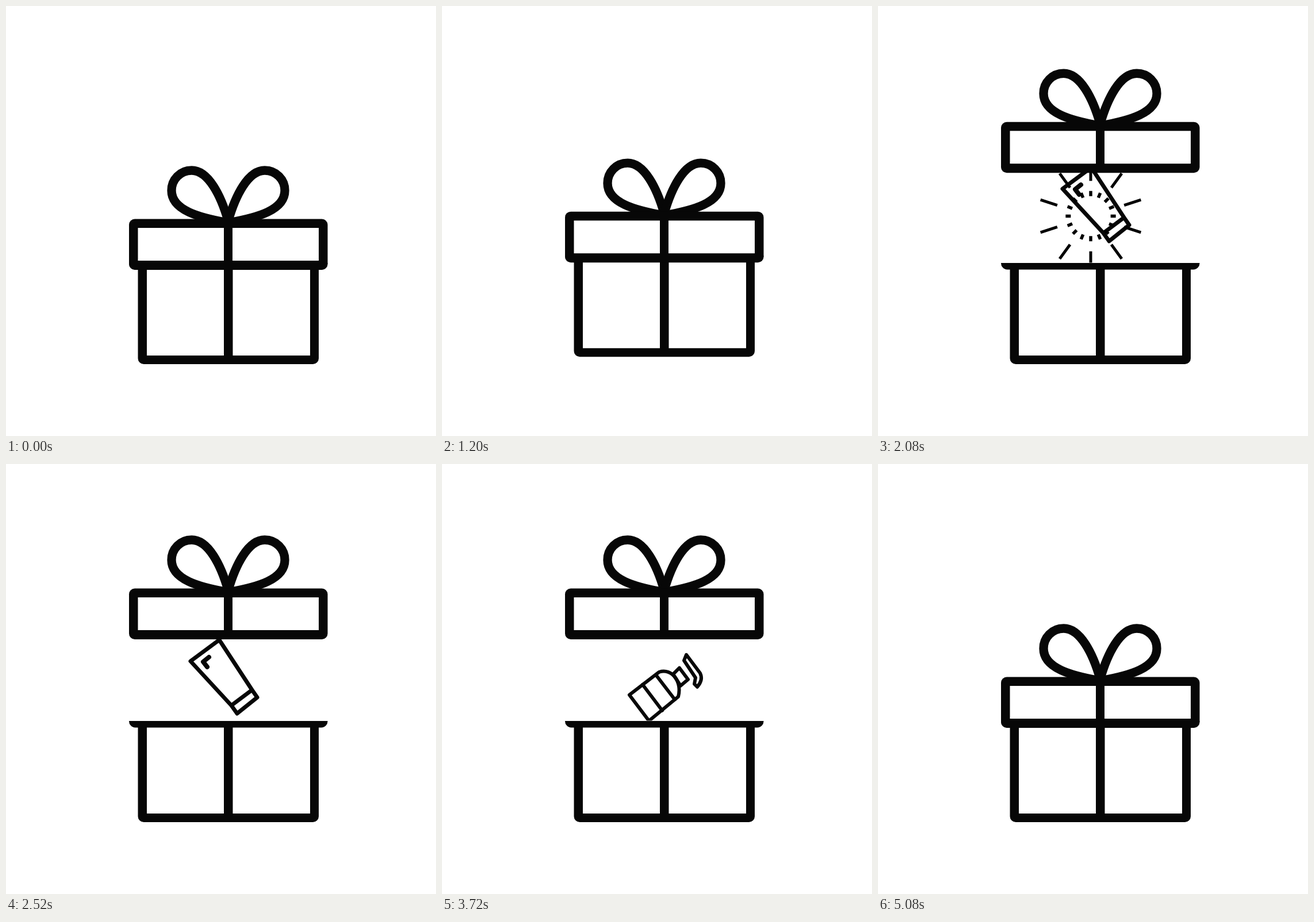
Recreate the animation shown at these times as an HTML page. Size 748 px wide and 748 px high, loop 5120 ms.

```html
<!DOCTYPE html>
<html lang="en">
<head>
<meta charset="utf-8">
<title>Gift box</title>
<style>
  html, body { margin: 0; width: 100%; height: 100%; overflow: hidden; background: #fff; }
  svg { display: block; width: 100%; height: 100%; }
  .line { fill: none; stroke: #070707; stroke-linejoin: round; stroke-linecap: round; }
  .ink { fill: #070707; }
  .paper { fill: #fff; }
</style>
</head>
<body>
<svg viewBox="0 0 748 748">
  <defs>
    <clipPath id="gap"><rect id="gapRect" x="0" width="748"/></clipPath>
    <filter id="blur" filterUnits="userSpaceOnUse" x="200" y="200" width="360" height="460">
      <feGaussianBlur id="blurAmount" stdDeviation="0"/>
    </filter>
    <path id="loop" d="M386.5 374C374 330 352 286 323 286C303 286 288 302 288 321C288 355 335 368 386 377"/>
  </defs>

  <g id="body">
    <path class="ink" d="M214 447H559.5A11 11 0 0 1 548.500 458.500H544V613A10 10 0 0 1 534 623H239.500A10 10 0 0 1 229.500 613V458.500H225A11 11 0 0 1 214 447Z"/>
    <path class="paper" d="M245 458.500H379V608H245ZM394.500 458.500H529V608H394.500Z"/>
  </g>

  <g clip-path="url(#gap)">
    <g class="item line" stroke-width="7">
      <g transform="translate(0 25)">
        <path d="M321 318L371 281L428 368L437 381L402 409L392 395ZM392 395L428 368"/>
        <path stroke-width="8" d="M353 311L343 319L350 328"/>
      </g>
    </g>
    <g class="item line" stroke-width="6">
      <g transform="translate(0 -40)">
        <path d="M326 438L378 398C400 391 418 415 411 441L360 483Z"/>
        <path d="M349 420L383 465M372 403L405 446"/>
        <path d="M402 402L413 391L428 411L415 422Z"/>
        <path d="M425 368L449 400C453 408 451 416 444 424L439 419L441 408L421 378Z"/>
      </g>
    </g>
    <g class="item line" stroke-width="5">
      <path d="M329 412L378 371L404 401L354 443ZM373 376L399 406M383 374L425 337L460 348L403 396"/>
    </g>
    <g transform="translate(370 365.500)" stroke="#000">
      <path id="rays"/>
      <path id="dashes"/>
    </g>
  </g>

  <g id="lid">
    <g class="line" stroke-width="15.300" style="stroke-linecap:butt">
      <use href="#loop"/>
      <use href="#loop" transform="matrix(-1 0 0 1 773 0)"/>
    </g>
    <rect class="ink" x="214" y="370.500" width="345.500" height="88.500" rx="10"/>
    <path class="paper" d="M229.500 386H379V443H229.500ZM394 386H544V443H394Z"/>
  </g>
</svg>
<script>
const LOOP = 5120, STEP = 40, OPEN = 154, DEPTH = 150;
const HOPS = [[0, 0], [280, 25], [560, 0], [850, 23], [1140, 6], [1440, 25], [1790, 0]];
const ITEMS = [
  { up: 1830, down: 2680, burst: 1930 },
  { up: 2930, down: 3690, burst: 3098 },
  { up: 3925, down: 4690, burst: 4090 }
];

const $ = id => document.getElementById(id);
const itemNodes = document.querySelectorAll('.item');
const clamp = x => Math.max(0, Math.min(1, x));
const part = (t, start, length) => clamp((t - start) / length);
const backOut = (u, s) => 1 + (s + 1) * (u - 1) ** 3 + s * (u - 1) ** 2;
const smooth = u => u * u * (3 - 2 * u);

// Height of the closed box: decelerates upward, accelerates downward.
function hop(t) {
  for (let i = 1; i < HOPS.length; i++) {
    const [t0, a] = HOPS[i - 1], [t1, b] = HOPS[i];
    if (t < t1) {
      const u = (t - t0) / (t1 - t0);
      return a + (b - a) * (b > a ? 1 - (1 - u) ** 2 : u * u);
    }
  }
  return 0;
}

function lidLift(t) {
  if (t < 1790) return hop(t);
  if (t < 4500) return OPEN * backOut(part(t, 1790, 380), 2.55);
  const top = OPEN + 20 * smooth(part(t, 4500, 200));
  return top * (1 - part(t, 4700, 380) ** 2);
}

function itemDrop(t, { up, down }) {
  const rise = backOut(part(t, up, 400), 2.5);
  return DEPTH * (1 - rise + part(t, down, 190) ** 2);
}

function spokes(count, turn, from, to) {
  let d = '';
  for (let i = 0; i < count; i++) {
    const a = turn + i * 2 * Math.PI / count, c = Math.cos(a), s = Math.sin(a);
    d += `M${c * from} ${s * from}L${c * to} ${s * to}`;
  }
  return d;
}

function drawBurst(t) {
  const item = ITEMS.find(i => t > i.burst && t < i.burst + 410);
  const p = item ? (t - item.burst) / 410 : 1;
  const tail = 150 * (1 - (1 - p) ** 1.15), head = 150 * (1 - (1 - p) ** 2.08);
  const r = 107 * p;
  $('rays').setAttribute('d', item ? spokes(10, Math.PI / 10, tail, head) : '');
  $('rays').setAttribute('stroke-width', 5 * clamp((1 - p) * 7));
  $('dashes').setAttribute('d', item ? spokes(16, 0, Math.max(0, r - 4.500), r + 4.500) : '');
  $('dashes').setAttribute('stroke-width', 6 - 1.500 * p);
}

function draw(t) {
  const lift = lidLift(t);
  $('lid').setAttribute('transform', `translate(0 ${-lift})`);
  $('body').setAttribute('transform', `translate(0 ${-hop(t)})`);

  const top = 458 - lift;
  $('gapRect').setAttribute('y', top);
  $('gapRect').setAttribute('height', t < 1790 ? 0 : Math.max(0, 446.500 - top));

  ITEMS.forEach((item, i) => {
    const node = itemNodes[i], y = itemDrop(t, item);
    const shown = t >= item.up && t < item.down + 190;
    node.style.display = shown ? '' : 'none';
    if (!shown) return;
    node.setAttribute('transform', `translate(0 ${y})`);
    const speed = Math.abs(itemDrop(t + 1, item) - y);
    if (speed > 0.5) {
      node.setAttribute('filter', 'url(#blur)');
      $('blurAmount').setAttribute('stdDeviation', Math.min(2.2, speed * 1.8));
    } else {
      node.removeAttribute('filter');
    }
  });
  drawBurst(t);
}

function tick() {
  const t = performance.now() % LOOP;
  draw(Math.floor(t / STEP) * STEP);
  requestAnimationFrame(tick);
}
tick();
</script>
</body>
</html>
```
